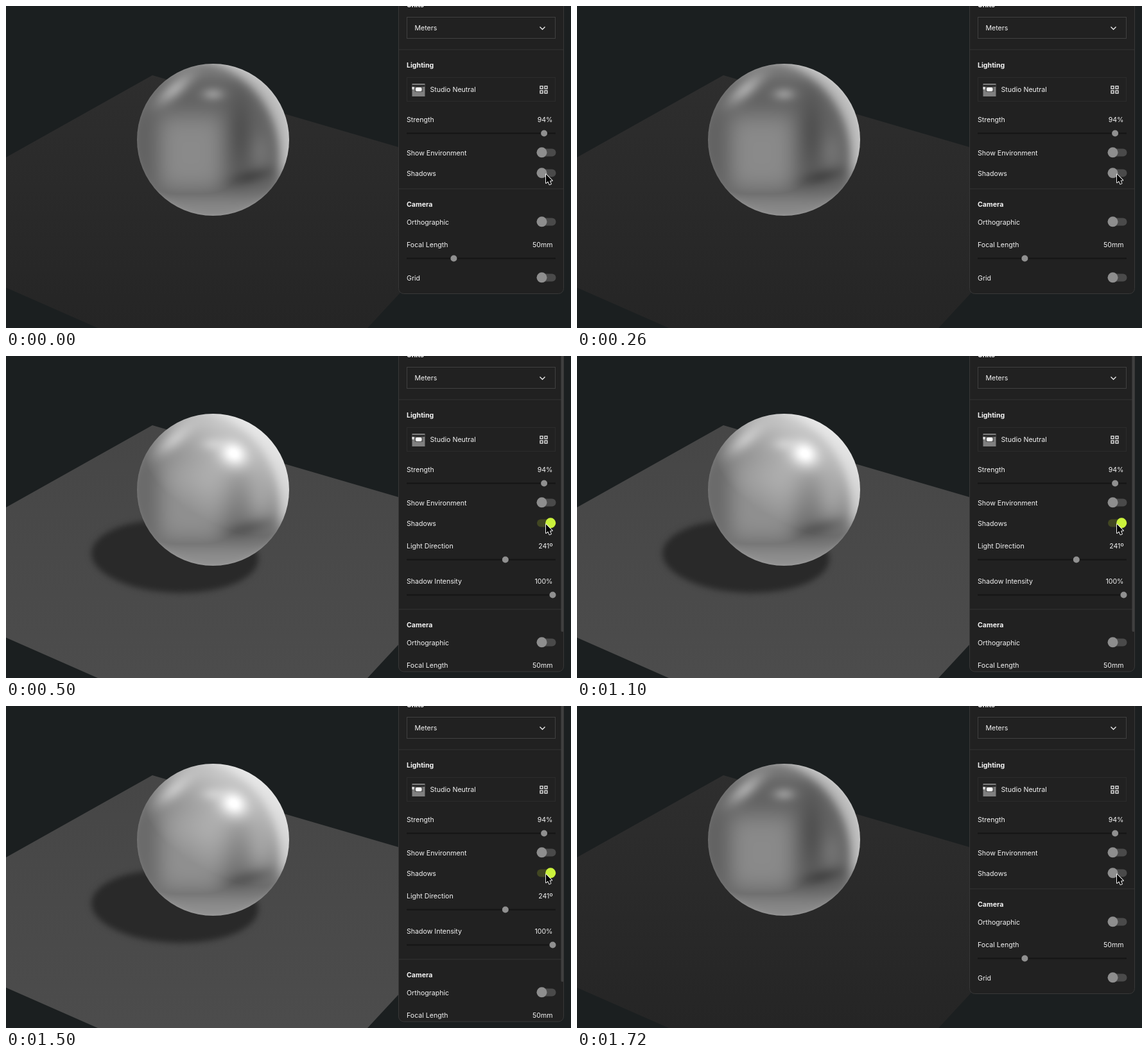
These frames come from a looping animation (880x502 px, 2.3 s). An HTML page with a canvas:

```html
<!DOCTYPE html>
<html lang="en">
<head>
<meta charset="utf-8">
<title>Shadow toggle</title>
<style>
html, body { margin: 0; width: 100%; height: 100%; overflow: hidden; background: #1b1f20; }
canvas { display: block; }
</style>
</head>
<body>
<canvas id="stage" width="880" height="502"></canvas>
<script>
const W = 880, H = 502, LOOP = 2300;
const BALL = { x: 322.5, y: 208.5, r: 118.5 };
const LEFT = 624, RIGHT = 856, PAD = 8;
const ctx = document.getElementById('stage').getContext('2d');

const clamp = v => Math.max(0, Math.min(1, v));
const ramp = (t, a, b) => clamp((t - a) / (b - a));
const smooth = p => p * p * (3 - 2 * p);
const gray = v => `rgb(${v},${v},${v})`;
const mix = (a, b, p) => `rgb(${a.map((v, i) => Math.round(v + (b[i] - v) * p))})`;

function makeCanvas() {
  const c = document.createElement('canvas');
  c.width = W;
  c.height = H;
  return c;
}

// --- Ball shading: u, v run from -1 to 1 across the disc ---

const step = (x, width) => 1 / (1 + Math.exp(-x / width));
const screen = (a, b) => a + (1 - a) * clamp(b);

function spot(u, v, x, y, rx, ry, turn = 0) {
  const c = Math.cos(turn), s = Math.sin(turn);
  const a = ((u - x) * c + (v - y) * s) / rx;
  const b = ((v - y) * c - (u - x) * s) / ry;
  return Math.exp(-a * a - b * b);
}

// Blurred reflection of the studio
function reflection(u, v) {
  const floor = step(v - .75, .07);
  const window = Math.exp(-(((u + .29) / .45) ** 4) - ((v - .17) / .54) ** 4);
  let s = .38 + .16 * Math.max(floor, window) + .08 * step(-.8 - v, .05);
  s += .25 * spot(u, v, -.51, -.66, .28, .11, -.68);
  s += .18 * spot(u, v, 0, -.6, .15, .09);
  s += .06 * spot(u, v, .62, .16, .15, .25);
  s -= .06 * spot(u, v, .36, -.1, .16, .5);
  s -= .1 * spot(u, v, .52, .48, .3, .1, -.25);
  const rim = step(Math.hypot(u + .4, v - .2) - 1.27, .04) * step(.45 - v, .08);
  return s + (.75 - s) * rim;
}

// Direct lamp: diffuse light plus a highlight around the half vector
const HALF = [.274, -.477, .835];
const LAMP = HALF.map((h, i) => 2 * HALF[2] * h - (i === 2 ? 1 : 0));
const dot = (a, b) => Math.max(0, a[0] * b[0] + a[1] * b[1] + a[2] * b[2]);

function shade(u, v, lamp) {
  const n = [u, v, Math.sqrt(Math.max(0, 1 - u * u - v * v))];
  let s = reflection(u, v) + .08 * (1 - n[2]) ** 6;
  if (lamp) {
    s = screen(s, .05 + .58 * dot(n, LAMP));
    s = screen(s, 1.05 * dot(n, HALF) ** 55);
  }
  return 255 * s;
}

function drawBall(g, lamp) {
  const c = makeCanvas(), b = c.getContext('2d');
  const img = b.createImageData(W, H);
  for (let y = 0; y < H; y++) {
    for (let x = 0; x < W; x++) {
      const u = (x + .5 - BALL.x) / BALL.r, v = (y + .5 - BALL.y) / BALL.r;
      if (Math.hypot(u, v) > 1.03) continue;
      const i = 4 * (y * W + x);
      img.data.fill(shade(u, v, lamp), i, i + 3);
      img.data[i + 3] = 255;
    }
  }
  b.putImageData(img, 0, 0);
  g.save();
  g.beginPath();
  g.arc(BALL.x, BALL.y, BALL.r, 0, 7);
  g.clip();
  g.drawImage(c, 0, 0);
  g.restore();
}

function polygon(g, points) {
  g.beginPath();
  points.forEach(p => g.lineTo(...p));
  g.closePath();
}

function scene(lamp) {
  const c = makeCanvas(), g = c.getContext('2d');
  g.fillStyle = '#1b1f20';
  g.fillRect(0, 0, W, H);

  const ground = g.createLinearGradient(0, 108, 0, H);
  ground.addColorStop(0, gray(lamp ? 70 : 46));
  ground.addColorStop(1, gray(lamp ? 76 : 37));
  g.fillStyle = ground;
  polygon(g, [[228, 108], [779, 269], [563, H], [143, H], [0, 439], [0, 236]]);
  g.fill();

  if (lamp) {
    g.filter = 'blur(5px)';
    g.fillStyle = gray(41);
    g.beginPath();
    g.ellipse(263, 312, 130, 57, .04, 0, 7);
    g.fill();
    g.filter = 'none';
  }
  drawBall(g, lamp);
  return c;
}

const unlit = scene(false), lit = scene(true);

// --- Panel: each part draws at y and returns where the next one starts ---

function write(text, x, y, align = 'left', weight = 400) {
  ctx.font = `${weight} 10.6px Inter, "Open Sans", sans-serif`;
  ctx.textAlign = align;
  ctx.fillStyle = '#f4f4f4';
  ctx.fillText(text, x, y + 4);
}

function disc(x, y, r, color) {
  ctx.fillStyle = color;
  ctx.beginPath();
  ctx.arc(x, y, r, 0, 7);
  ctx.fill();
}

function pill(x, y, w, h, r, color) {
  ctx.fillStyle = color;
  ctx.beginPath();
  ctx.roundRect(x, y, w, h, r);
  ctx.fill();
}

function heading(text, y) {
  write(text, LEFT, y + 16.5, 'left', 700);
  return y + 28.5;
}

function box(text, indent, y, h, border) {
  ctx.strokeStyle = border;
  ctx.lineWidth = 1;
  ctx.strokeRect(LEFT + .5, Math.floor(y + PAD) + .5, RIGHT - LEFT - 1, h - 1);
  write(text, LEFT + indent, y + PAD + h / 2 - .3);
  return y + h + 2 * PAD;
}

function slider(name, amount, part, y) {
  const mid = y + 19, line = mid + 22;
  write(name, LEFT, mid);
  write(amount, 851.5, mid, 'right');
  ctx.fillStyle = '#151515';
  ctx.fillRect(LEFT, line - 1, RIGHT - LEFT, 2);
  disc(628.5 + 223 * part, line, 5, gray(144));
  return y + 55;
}

function toggle(name, y, on = 0) {
  const mid = y + 16;
  write(name, LEFT, mid);
  pill(827, mid - 6, 29.5, 12, 6, mix([74, 74, 74], [65, 70, 34], on));
  disc(834.5 + 13.7 * on, mid - .2, 8, mix([142, 142, 142], [203, 242, 60], on));
  return y + 32;
}

function divider(y) {
  ctx.fillStyle = '#353535';
  ctx.fillRect(612, y + PAD, 256, 1);
  return y + PAD * 2;
}

function thumbnail(x, y) {
  pill(x, y, 20, 20, 0, gray(128));
  pill(x, y + 2, 20, 3, 0, gray(45));
  pill(x + 4, y + 5, 13, 8, 0, gray(90));
  pill(x, y + 5, 3, 4, 0, gray(225));
  pill(x + 5.5, y + 6, 9.5, 6, 2, gray(255));
}

function icons() {
  ctx.strokeStyle = '#f0f0f0';
  ctx.lineWidth = 1.3;
  ctx.beginPath();
  for (const [x, y] of [[-4, -2], [0, 2], [4, -2]]) ctx.lineTo(835.5 + x, 34.5 + y);
  ctx.stroke();
  for (let i = 0; i < 4; i++)
    ctx.strokeRect(832 + 7 * (i % 2), 125 + 7 * (i >> 1), 4, 4);
  thumbnail(632.5, 121);
}

function card(bottom) {
  ctx.beginPath();
  ctx.roundRect(611.5, -20, 257, bottom + 20, 8);
}

function panel(open, on) {
  const bottom = open ? 492 : 448.5;
  ctx.save();
  card(bottom);
  ctx.fillStyle = '#212121';
  ctx.fill();
  ctx.clip();

  let y = heading('Units', -19);
  y = box('Meters', 12.5, y, 34, '#404040');
  y = divider(y);
  y = heading('Lighting', y - .5);
  y = box('Studio Neutral', 36.5, y, 38, '#2c2c2c');
  icons();
  y = slider('Strength', '94%', .94, y);
  y = toggle('Show Environment', y);
  y = toggle('Shadows', y, on);
  if (open) {
    y = slider('Light Direction', '241º', 241 / 360, y);
    y = slider('Shadow Intensity', '100%', 1, y);
  }
  y = divider(y);
  y = heading('Camera', y - .5);
  y = toggle('Orthographic', y);
  y = slider('Focal Length', '50mm', .309, y);
  toggle('Grid', y);
  if (open) pill(864.5, -10, 4, 440, 2, gray(64));
  ctx.restore();

  card(bottom);
  ctx.strokeStyle = '#383838';
  ctx.lineWidth = 1;
  ctx.stroke();
}

function pointer(press) {
  const size = .92 - .05 * press;
  ctx.save();
  ctx.translate(841, 262.3);
  ctx.scale(size, size);
  polygon(ctx, [[0, 0], [0, 15], [3.5, 12], [6, 17.5], [8.6, 16.3], [6.3, 11], [10.6, 10.8]]);
  ctx.lineJoin = 'round';
  ctx.lineWidth = 2;
  ctx.strokeStyle = '#fff';
  ctx.stroke();
  ctx.fillStyle = '#000';
  ctx.fill();
  ctx.restore();
}

const click = (t, at) => smooth(ramp(t, at, at + 80)) - smooth(ramp(t, at + 100, at + 200));

function draw(t) {
  const open = t >= 280 && t < 1540;
  const on = smooth(ramp(t, 280, 480)) - smooth(ramp(t, 1540, 1720));
  ctx.drawImage(open ? lit : unlit, 0, 0);
  panel(open, on);
  pointer(click(t, 180) + click(t, 1400));
}

const start = performance.now();
function tick() {
  draw((performance.now() - start) % LOOP);
  requestAnimationFrame(tick);
}
tick();
</script>
</body>
</html>
```
